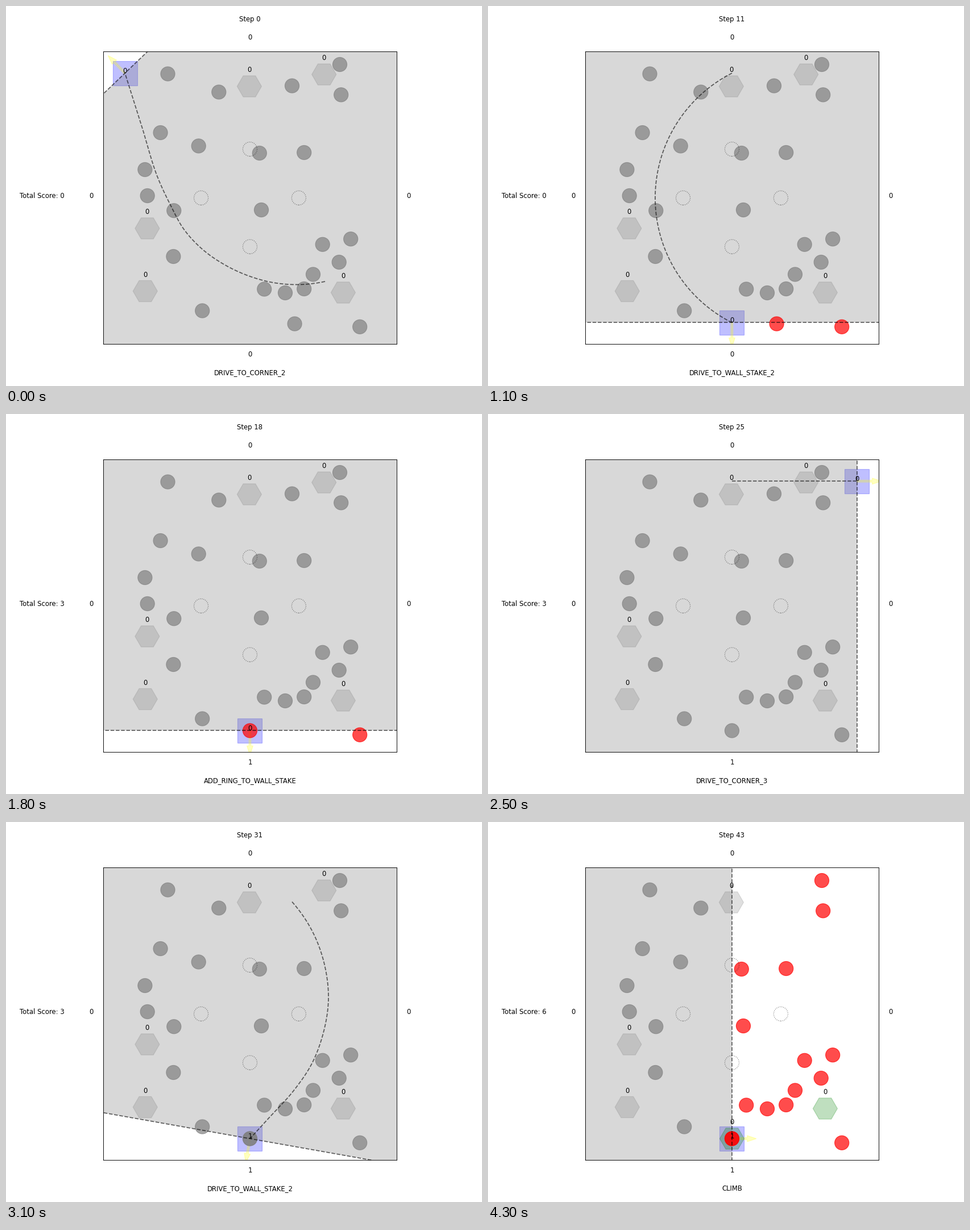
Animation of 837 by 669 pixels, one loop 4.4 s. Source, as a matplotlib script:

```python
import numpy as np
import matplotlib.pyplot as plt
from matplotlib.animation import FuncAnimation
from matplotlib.patches import Circle, FancyArrow, Polygon, Rectangle, RegularPolygon

W, H, DPI = 837, 669, 64
PT = 83.7 / DPI            # size of one drawing point on this canvas
HALF = 72                  # half the field, in inches
SX, SY = 0.616 * W / 144, 0.77 * H / 144
WALL = HALF - np.hypot(15, 15) / 2
CLEAR = 37.7               # distance kept from the ladder

plt.rcParams.update({
    "font.family": "DejaVu Sans",
    "font.size": 10 * PT,
    "axes.linewidth": 0.8 * PT,
    "patch.linewidth": PT,
    "lines.linewidth": 1.5 * PT,
})


def inches(points):
    """Stage positions to field positions."""
    p = np.array(points, float)
    return np.column_stack([(p[:, 0] - 0.5125 * W) / SX, (0.505 * H - p[:, 1]) / SY])


RINGS = inches([
    (284.5, 119.5), (374.3, 151.5), (503, 140.5), (587, 103), (589.2, 156.3),
    (271.6, 223), (338.7, 246.4), (445.8, 259), (524.2, 258), (244.4, 288),
    (248.7, 334), (295.3, 360.2), (449, 359), (556.7, 419.8), (606.2, 410.2),
    (294.4, 441), (585.7, 451), (540, 472.5), (454.2, 498.5), (491, 505),
    (524.2, 498), (345.2, 536.5), (507.6, 559.5), (622.2, 564.8),
])
GOALS = inches([(427.9, 141.5), (559.2, 120.5), (248.4, 391.5), (244.8, 502), (592.9, 504.5)])
START = inches([(561, 485)])[0]

CORNERS = WALL * np.array([(-1, -1), (1, -1), (-1, 1), (1, 1)])
STAKES = WALL * np.array([(-1, 0), (1, 0), (0, -1), (0, 1)])
STAKE_LABELS = STAKES / WALL * 78

# C corner, W wall stake, R ring, A add ring, G goal, T turn, X climb
PLAN = ("C2 W0 C0 T W1 C1 W1 C3 T C2 W3 W2 R C1 W1 T W3 W2 A C0 W0 T "
        "C2 T W3 C3 T W1 C2 W3 R W2 T C1 T W1 G1 C3 T C2 W0 C0 W2 X").split()
NAMES = {
    "C": "DRIVE_TO_CORNER_", "W": "DRIVE_TO_WALL_STAKE_", "G": "PICK_UP_GOAL_",
    "R": "PICK_UP_NEXT_NEAREST_RING", "A": "ADD_RING_TO_WALL_STAKE",
    "T": "TURN_TOWARDS_CENTER", "X": "CLIMB",
}

# Two drives swing unevenly around the ladder
BENDS = {
    0: [(561, 485), (511, 490.5), (470, 487), (429, 476), (387, 457), (345, 428),
        (312, 392), (290, 352), (268, 305), (240, 216), (209.2, 118.3)],
    31: [(503, 140.5), (540, 195), (562, 260), (567, 310), (557, 375), (538, 425),
         (505, 474), (465, 518), (429, 557.5)],
}


def smooth(p, n=16):
    """Hermite curve through a few points."""
    s = np.r_[0, np.cumsum(np.hypot(*np.diff(p, axis=0).T))]
    m = np.gradient(p, s, axis=0, edge_order=2)
    t = np.linspace(0, 1, n)[:, None]
    parts = []
    for i, h in enumerate(np.diff(s)):
        parts.append((1 + 2 * t) * (1 - t) ** 2 * p[i] + t * (1 - t) ** 2 * h * m[i]
                     + t * t * (3 - 2 * t) * p[i + 1] + t * t * (t - 1) * h * m[i + 1])
    return np.vstack(parts)


def route(a, b):
    """Straight drive, or an arc where the ladder is in the way."""
    size = np.hypot(*(b - a))
    if size < 1e-6:
        return None
    u = (b - a) / size
    side = np.array([u[1], -u[0]])
    dist = a @ side
    if dist < -1e-9:
        side, dist = -side, -dist
    if dist >= CLEAR or not 0 < -(a @ u) < size:
        return np.array([a, b])
    sag, h = CLEAR - dist, size / 2
    r = (h * h + sag * sag) / (2 * sag)
    t = np.linspace(0, 1, 80)[:, None]
    off = np.sqrt(np.maximum(r * r - (h * (1 - 2 * t)) ** 2, 0)) - (r - sag)
    return a + (b - a) * t + side * off


def seen(p, pos, head):
    rel = p - pos
    if np.abs(rel).max() < 1e-9:
        rel = np.array([1.0, 0.0])
    return rel @ head > -1e-6


def simulate():
    pos, head = START.copy(), np.array([0.0, 1.0])
    rings, goals = RINGS.copy(), GOALS.copy()
    held, goal, used = None, None, set()
    counts, score, states = [0] * 4, 0, []
    for step, code in enumerate(PLAN):
        kind, num = code[0], int(code[1:] or 0)
        dest, path = None, None
        if kind == "C":
            dest = CORNERS[num]
        elif kind == "W":
            dest = STAKES[num]
        elif kind == "G":
            dest, goal = goals[num].copy(), num
        elif kind == "R":
            free = [i for i in range(len(rings))
                    if i not in used and seen(rings[i], pos, head)]
            held = min(free, key=lambda i: np.hypot(*(rings[i] - pos)))
            used.add(held)
            dest = rings[held].copy()
        elif kind == "A":
            held = None
            counts[2] += 1
            score += 3
        elif kind == "X":
            score += 3
        else:
            head = -pos / np.hypot(*pos)
        if dest is not None:
            path = smooth(inches(BENDS[step])) if step in BENDS else route(pos, dest)
            gap = dest - pos
            if np.hypot(*gap) > 1e-6:
                head = gap / np.hypot(*gap)
            pos = dest
        if held is not None:
            rings[held] = pos
        if goal is not None:
            goals[goal] = pos
        label = NAMES[kind] + (str(num) if kind in "CWG" else "")
        states.append(dict(pos=pos.copy(), head=head.copy(), rings=rings.copy(),
                           goals=goals.copy(), held=int(held is not None), path=path,
                           counts=counts[:], score=score, label=label))
    return states


STATES = simulate()
fig = plt.figure(figsize=(W / DPI, H / DPI), dpi=DPI, facecolor="white")
ax = fig.add_axes([0.2045, 0.11, 0.616, 0.77])


def write(x, y, text):
    ax.text(x, y, str(text), ha="center")


def dashed(points):
    ax.plot(*np.transpose(points), "k--", alpha=0.6)


def draw(step):
    s = STATES[step]
    pos, head = s["pos"], s["head"]
    across = np.array([head[1], -head[0]])
    if across[0] < 0:
        across = -across
    ax.clear()
    ax.set(xlim=(-HALF, HALF), ylim=(-HALF, HALF), xticks=[], yticks=[])

    ax.add_patch(Rectangle(pos - 6, 12, 12, color="blue", alpha=0.25))
    ax.add_patch(FancyArrow(*pos, *(12 * head), width=1, head_width=3, head_length=4.5,
                            length_includes_head=True, color="yellow", alpha=0.25))
    ends = [pos - 226.4 * across, pos + 226.4 * across]
    back = -250 * head
    ax.add_patch(Polygon([*ends, ends[1] + back, ends[0] + back],
                         facecolor="gray", alpha=0.3, linewidth=0))
    dashed(ends)
    if s["path"] is not None:
        dashed(s["path"])

    for g in s["goals"]:
        color = "green" if seen(g, pos, head) else "gray"
        ax.add_patch(RegularPolygon(g, 6, radius=6, orientation=np.pi / 6,
                                    color=color, alpha=0.25))
        write(g[0], g[1] + 7, 0)
    for r in s["rings"]:
        color = "red" if seen(r, pos, head) else "gray"
        ax.add_patch(Circle(r, 3.5, color=color, alpha=0.7))
    for post in [(-24, 0), (24, 0), (0, -24), (0, 24)]:
        ax.add_patch(Circle(post, 3.5, fill=False, edgecolor="black",
                            linestyle=":", alpha=0.5))

    write(*pos, s["held"])
    for p, n in zip(STAKE_LABELS, s["counts"]):
        write(*p, n)
    write(0, 86.9, f"Step {step}")
    write(0, -86.9, s["label"])
    write(-102.2, 0, f"Total Score: {s['score']}")
    return []


anim = FuncAnimation(fig, draw, frames=len(PLAN), interval=100,
                     init_func=lambda: [], repeat=True, repeat_delay=0)
plt.show()
```
